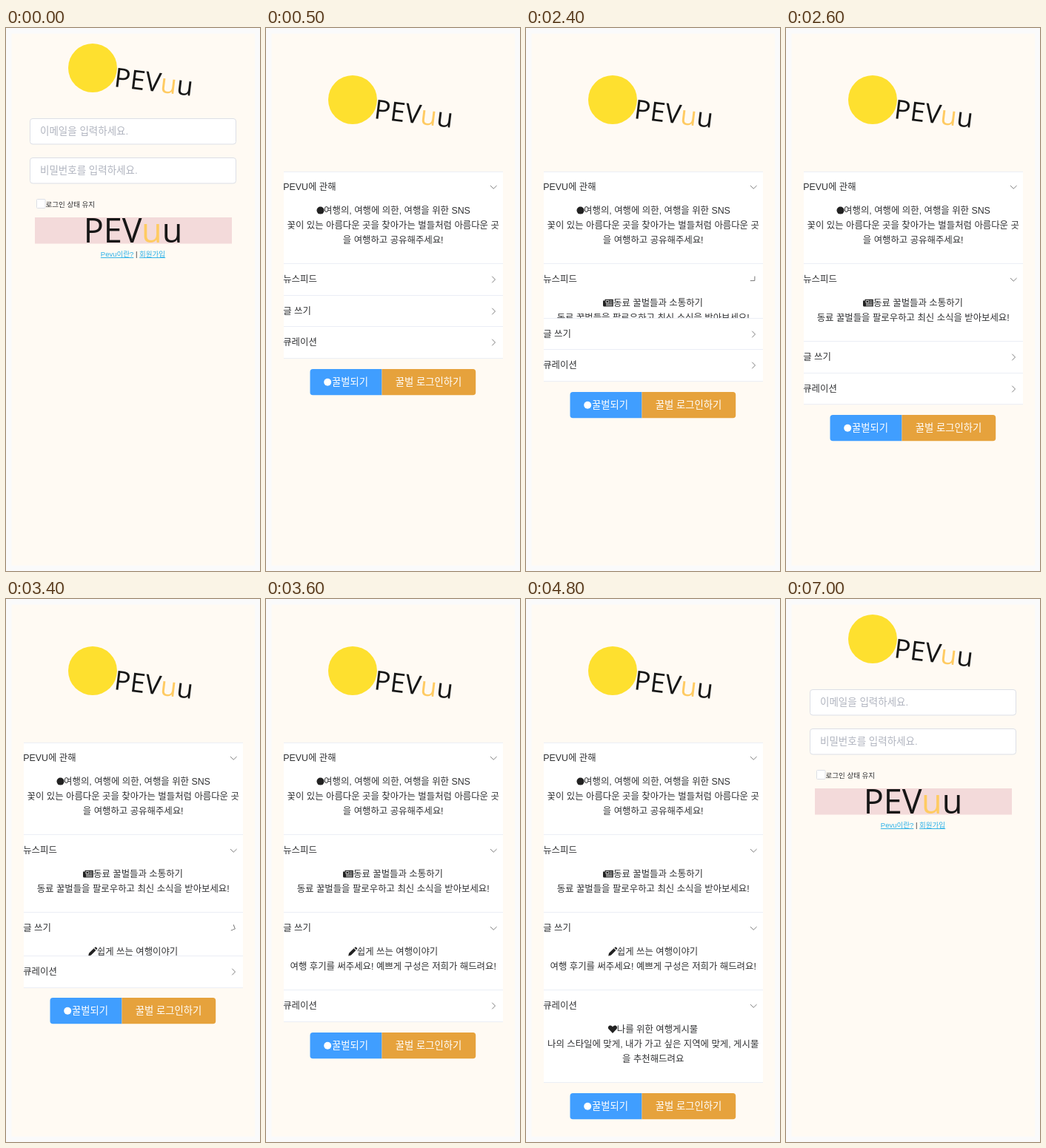
An HTML page that plays this animation: 343 px wide and 734 px high, repeating every 8000 ms.

```html
<!DOCTYPE html>
<html lang="ko">
<head>
<meta charset="utf-8">
<title>Accordion</title>
<style>
  html, body { margin: 0; width: 100%; height: 100%; overflow: hidden; background: #fafafb; }
  svg { display: block; }
  text { font: 12.4px "Liberation Sans", "Noto Sans CJK KR", "Noto Sans CJK", sans-serif; fill: #303133; }
  .mid { text-anchor: middle; }
  .small { font-size: 9.53px; }
  .hint { font-size: 13.5px; fill: #b0b4bf; }
  .link { fill: #2bb1e8; text-decoration: underline; }
  .button { font-size: 13.34px; font-weight: 500; fill: #fff; }
  .word { font-family: "Open Sans", sans-serif; font-weight: 500; fill: #161616; }
  .accent { fill: #ffcb62; }
  .field { fill: #fff; stroke: #dcdfe6; }
  .arrow { fill: none; stroke: #707070; stroke-width: .9; }
</style>
</head>
<body>
<svg id="stage" width="343" height="734" viewBox="0 0 343 734">
  <defs>
    <g id="brand">
      <circle cx="117" cy="54" r="33" fill="#fee02f"/>
      <text class="word" transform="translate(145 79) rotate(7)" style="font-size:36px">PEV<tspan class="accent">u</tspan>u</text>
    </g>
    <!-- Icons are centred on their own origin. -->
    <circle id="dot" r="5"/>
    <g id="news">
      <path d="M-4.5-4.8H6.8V4.8H-5.5Q-7 4.8-7 3.3V-3H-4.5Z"/>
      <path d="M-3-3.2H.8V0H-3ZM2-2.7H5.5M2-.5H5.5M-3 1.6H5.5M-3 3.4H5.5" fill="none" stroke="#fff" stroke-width=".8"/>
    </g>
    <path id="pencil" d="M-5.8 5.8L-5 2.2 1.6-4.4 4.4-1.6-2.2 5ZM2.4-5.1L3.4-6Q4.2-6.5 5-5.7L5.7-5Q6.5-4.2 5.9-3.4L5.1-2.4Z"/>
    <path id="heart" d="M0 5.4L-5.2 0C-7.3-2.5-5.4-5.3-3-5.1-1.4-5-.5-4 0-3.2.5-4 1.4-5 3-5.1 5.4-5.3 7.3-2.5 5.2 0Z"/>
  </defs>

  <rect x="7.6" y="7.6" width="328.6" height="719" fill="#fffaf3"/>

  <g id="login">
    <use href="#brand"/>
    <rect class="field" x="32.5" y="122.5" width="278" height="34.5" rx="3.5"/>
    <text class="hint" x="46" y="144.2">이메일을 입력하세요.</text>
    <rect class="field" x="32.5" y="175.5" width="278" height="34.5" rx="3.5"/>
    <text class="hint" x="46" y="197.2">비밀번호를 입력하세요.</text>
    <rect class="field" x="41.5" y="231.5" width="11.5" height="12" rx="1"/>
    <text class="small" x="53.5" y="242">로그인 상태 유지</text>
    <rect x="39" y="256" width="266" height="35.5" fill="#f3dada"/>
    <text class="word mid" x="171.5" y="289.5" style="font-size:45px">PEV<tspan class="accent">u</tspan>u</text>
    <text class="small mid" x="171.5" y="309"><tspan class="link">Pevu이란?</tspan> | <tspan class="link">회원가입</tspan></text>
  </g>

  <g id="about">
    <use href="#brand" y="43"/>
    <g id="sections"></g>
    <rect x="24" y="194" width="296" height="1" fill="#ebeef5"/>
    <g id="buttons">
      <path d="M156.5 0V35.3H63.3a3.8 3.8 0 0 1-3.8-3.8V3.8A3.8 3.8 0 0 1 63.3 0Z" fill="#409eff"/>
      <path d="M156.5 0H279.4a3.8 3.8 0 0 1 3.8 3.8V31.5a3.8 3.8 0 0 1-3.8 3.8H156.5Z" fill="#e6a23c"/>
      <use href="#dot" x="83.2" y="17.8" fill="#fff"/>
      <text class="button" x="89" y="22.4">꿀벌되기</text>
      <text class="button" x="174.8" y="22.2">꿀벌 로그인하기</text>
    </g>
  </g>
</svg>

<script>
const LOOP = 8000, STEP = 50, OPENING = 300;
const TOP = 194, HEADER = 42.7, LINE = 19.8, PADDING = 22.8;
const $ = id => document.getElementById(id);

const sections = [
  { title: 'PEVU에 관해', icon: 'dot', iconX: 73.5, firstX: 177, start: -OPENING, lines: [
    '여행의, 여행에 의한, 여행을 위한 SNS',
    '꽃이 있는 아름다운 곳을 찾아가는 벌들처럼 아름다운 곳',
    '을 여행하고 공유해주세요!'] },
  { title: '뉴스피드', icon: 'news', iconX: 111, firstX: 178.5, start: 2250, lines: [
    '동료 꿀벌들과 소통하기',
    '동료 꿀벌들을 팔로우하고 최신 소식을 받아보세요!'] },
  { title: '글 쓰기', icon: 'pencil', iconX: 117, firstX: 177.5, start: 3300, lines: [
    '쉽게 쓰는 여행이야기',
    '여행 후기를 써주세요! 예쁘게 구성은 저희가 해드려요!'] },
  { title: '큐레이션', icon: 'heart', iconX: 117, firstX: 177.5, start: 4450, lines: [
    '나를 위한 여행게시물',
    '나의 스타일에 맞게, 내가 가고 싶은 지역에 맞게, 게시물',
    '을 추천해드려요'] }
];

$('sections').innerHTML = sections.map(s => `
  <svg width="343">
    <rect x="24" width="296" height="100%" fill="#fff"/>
    <text x="23.2" y="25">${s.title}</text>
    <path class="arrow" d="M-2-4.3L2.2 0-2 4.3"/>
    <use href="#${s.icon}" x="${s.iconX}" y="52.6" fill="#222"/>
    ${s.lines.map((line, i) =>
      `<text class="mid" x="${i ? 171.7 : s.firstX}" y="${57 + i * LINE}">${line}</text>`).join('')}
    <rect x="24" y="100%" width="296" height="1" transform="translate(0 -1)" fill="#ebeef5"/>
  </svg>`).join('');

const panels = [...$('sections').children];
const arrows = panels.map(panel => panel.querySelector('.arrow'));

function easeInOut(p) {
  p = Math.min(1, Math.max(0, p));
  return p * p * (3 - 2 * p);
}

function draw(time) {
  const t = Math.floor(time % LOOP / STEP) * STEP;
  const aboutOpen = t >= 500 && t < 7000;
  $('login').style.display = aboutOpen ? 'none' : '';
  $('about').style.display = aboutOpen ? '' : 'none';

  let y = TOP;
  sections.forEach((s, i) => {
    const open = easeInOut((t - s.start) / OPENING);
    const end = y + HEADER + open * (s.lines.length * LINE + PADDING);
    panels[i].setAttribute('y', Math.round(y));
    panels[i].setAttribute('height', Math.round(end) - Math.round(y));
    arrows[i].setAttribute('transform', `translate(307.3 21) rotate(${90 * open})`);
    y = end;
  });
  $('buttons').setAttribute('transform', `translate(0 ${Math.round(y + 13.8)})`);
}

const began = performance.now();
function tick() {
  draw(performance.now() - began);
  requestAnimationFrame(tick);
}
tick();
</script>
</body>
</html>
```
